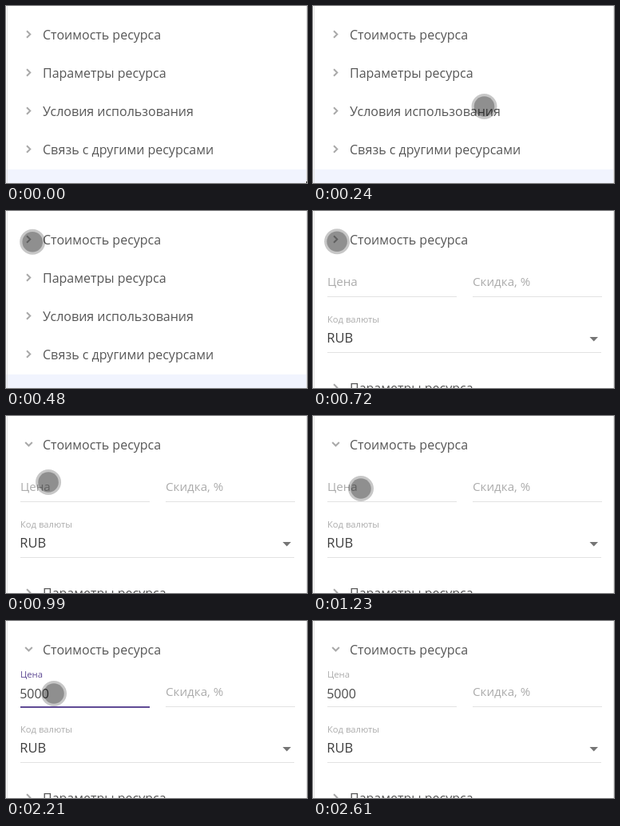
An HTML page that plays this animation: 377x222 px, repeating every 2670 ms.

```html
<!DOCTYPE html>
<html lang="ru">
<head>
<meta charset="utf-8">
<title>Форма ресурса</title>
<style>
html, body { margin: 0; width: 100%; height: 100%; overflow: hidden; background: #fff; }
svg { display: block; width: 377px; height: 222px; }
text { font: 16px "Open Sans", sans-serif; fill: #575757; }
.hint { font-size: 15.2px; fill: #acacac; }
.small { font-size: 11.2px; fill: #acacac; }
.value { fill: #4a4a4a; }
.code { font-size: 16.5px; fill: #3e3e3e; }
.chevron { fill: none; stroke: #a9a9a9; stroke-width: 2; }
.line { fill: #e2e2e2; }
</style>
</head>
<body>
<svg viewBox="0 0 377 222">
  <rect width="377" height="222" fill="#fff"/>
  <g id="closed">
    <rect y="205" width="377" height="17" fill="#f1f4fe"/>
  </g>
  <g id="open">
    <text class="hint" x="200" y="94">Скидка, %</text>
    <text class="small" x="18" y="140">Код валюты</text>
    <text class="code" x="17.2" y="165">RUB</text>
    <path d="M346.5 158h10.5l-5.25 5.5z" fill="#757575"/>
    <rect class="line" x="18" y="107" width="162" height="1"/>
    <rect class="line" x="200" y="107" width="162" height="1"/>
    <rect class="line" x="18" y="177" width="343" height="1"/>
    <rect id="focus" y="107" height="2" fill="#5f4a94"/>
    <text id="label" class="hint"></text>
    <text id="price" class="value" x="17.2" y="97"></text>
    <rect id="caret" y="82" width="1" height="18" fill="#4a4a4a"/>
  </g>
  <rect x="1" width="1" height="222" fill="#e2e2e2"/>
  <rect x="376" width="1" height="222" fill="#e2e2e2"/>
  <rect id="tip" x="376" y="220" width="1" height="2" fill="#222"/>
  <g id="pointer">
    <circle r="16" fill="#000" fill-opacity=".22"/>
    <circle r="12.8" fill="#000" fill-opacity=".28"/>
  </g>
</svg>
<script>
const LOOP = 2670, OPEN_AT = 720;
const NS = "http://www.w3.org/2000/svg";
const $ = id => document.getElementById(id);
const set = (el, attrs) => { for (const k in attrs) el.setAttribute(k, attrs[k]); };
const show = (el, on) => set(el, { visibility: on ? "visible" : "hidden" });
const span = (t, a, b) => Math.min(1, Math.max(0, (t - a) / (b - a)));
const mix = (a, b, p) => a + (b - a) * p;
const easeOut = (p, n = 2) => 1 - (1 - p) ** n;
const blend = (a, b, p) => `rgb(${a.map((v, i) => Math.round(mix(v, b[i], p)))})`;

const GREY = [172, 172, 172], PURPLE = [95, 74, 148];

function add(parent, tag, attrs, text = "") {
  const el = document.createElementNS(NS, tag);
  set(el, attrs);
  el.textContent = text;
  return parent.appendChild(el);
}

const svg = document.querySelector("svg");
const rows = ["Стоимость ресурса", "Параметры ресурса", "Условия использования", "Связь с другими ресурсами"]
  .map((title, i) => {
    const g = add(svg, "g", {});
    add(g, "text", { x: 46, y: 42 }, title);
    const chevron = add(g, "path", { class: "chevron", d: "M-2.5 -4.3L1.8 0L-2.5 4.3" });
    return { g, chevron, y: 48 * i };
  });
svg.append($("tip"), $("pointer"));
$("label").textContent = "Цена";

// Each move: start, end, from, to, ease power per axis
const moves = [
  [130, 510, [376, 221], [30, 38], [1.82, 2.12]],
  [720, 1230, [30, 38], [60, 91], [1.93, 2.5]],
  [2430, 2610, [60, 91], [92, 158], [1.6, 1.6]]
];

function pointerAt(t) {
  const [a, b, from, to, power] = moves.filter(m => t >= m[0]).pop() || moves[0];
  return from.map((v, i) => mix(v, to[i], easeOut(span(t, a, b), power[i])));
}

function draw(t) {
  const open = t >= OPEN_AT;
  show($("closed"), !open);
  show($("open"), open);
  rows.forEach(({ g, chevron, y }, i) => {
    set(g, { transform: `translate(0 ${y + (open && i ? 138 : 0)})` });
    const turn = i ? 0 : 90 * span(t, OPEN_AT, OPEN_AT + 220);
    set(chevron, { transform: `translate(28.5 35.5) rotate(${turn})` });
  });

  const lift = easeOut(span(t, 1270, 1480));
  const blur = span(t, 2480, 2610);
  const tint = span(t, 1270, 1400) * (1 - blur);
  set($("label"), {
    transform: `translate(18 ${mix(94, 71, lift)}) scale(${mix(1, .74, lift)})`,
    style: `fill:${blend(GREY, PURPLE, tint)}`
  });
  const width = 162 * mix(.5, 1, lift);
  set($("focus"), { x: 99 - width / 2, width, opacity: tint });

  const typed = [1770, 1860, 1940, 2030].filter(k => t >= k).length;
  $("price").textContent = "5000".slice(0, typed);
  set($("caret"), { x: 18 + 9.15 * typed });
  show($("caret"), (t >= 1280 && t < 1490) || (t >= 1680 && t < 2210));

  show($("tip"), t < 130);
  show($("pointer"), t >= 130 && t < 2610);
  set($("pointer"), { transform: `translate(${pointerAt(t)})` });
}

const start = performance.now();
function tick() {
  draw((performance.now() - start) % LOOP);
  requestAnimationFrame(tick);
}
draw(0);
requestAnimationFrame(tick);
</script>
</body>
</html>
```
